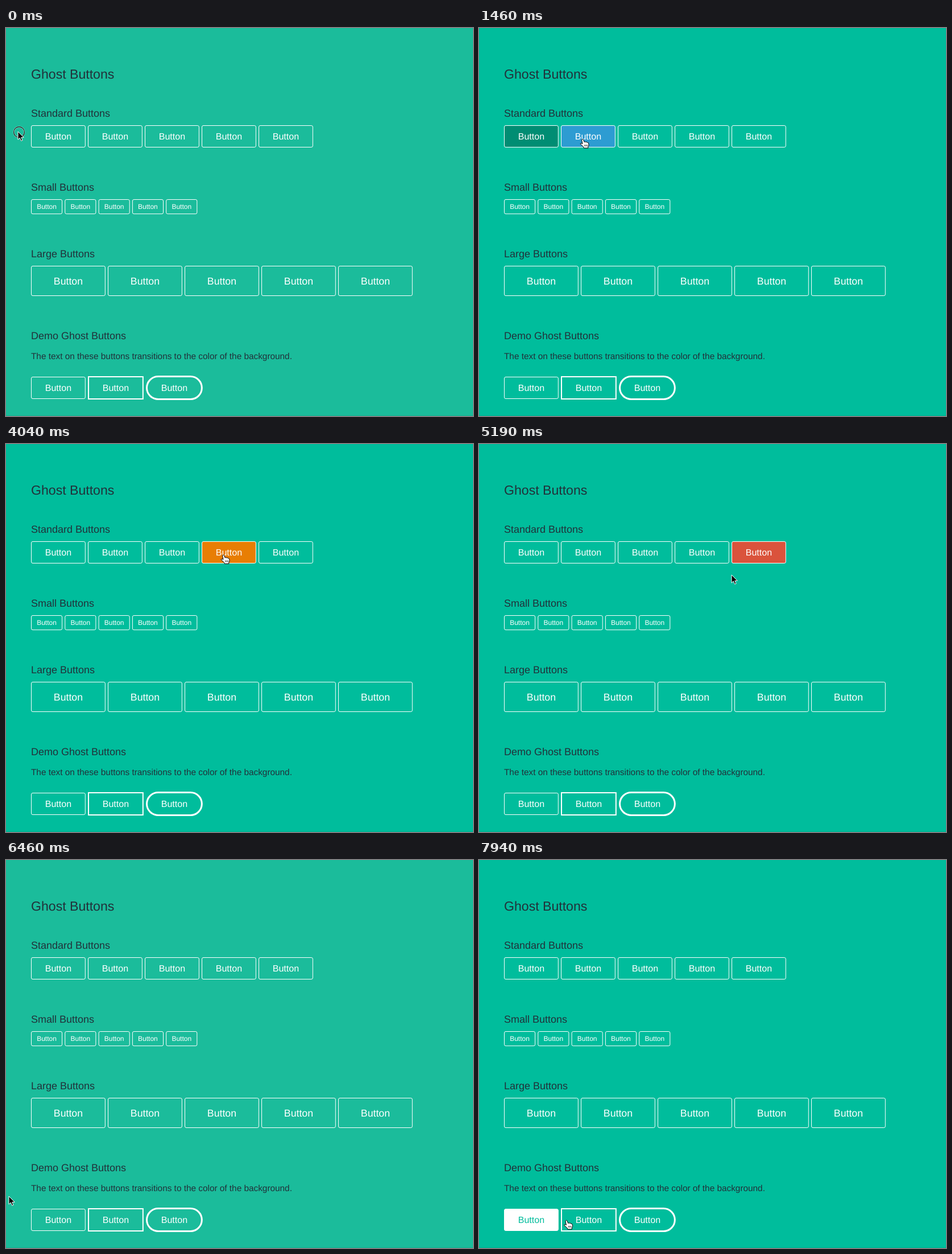
An HTML page for the animation above (8 s loop, 821 px wide and 682 px high).

```html
<!DOCTYPE html>
<html lang="en">
<head>
<meta charset="utf-8">
<title>Ghost Buttons</title>
<style>
  html, body { margin: 0; width: 100%; height: 100%; overflow: hidden; }
  svg {
    display: block;
    font-family: "Liberation Sans", Arial, sans-serif;
    text-rendering: geometricPrecision;
  }
  .dark { fill: #22313a; }
</style>
</head>
<body>
<svg id="stage" width="821" height="682" viewBox="0 0 821 682">
  <rect id="back" width="821" height="682"/>
  <rect y="680.5" width="821" height="1.5" fill="#000" opacity=".06"/>
  <g id="page"></g>
  <g id="ring" fill="none">
    <circle cx="23" cy="183" r="9.3" stroke="#fff" stroke-opacity=".6" stroke-width="2.4"/>
    <circle cx="23" cy="183" r="9.4" stroke="#111" stroke-width="1.2"/>
  </g>
  <path id="arrow" d="M0 0V14.2L3.3 11.1L5.6 16.4L8 15.4L5.8 10.3H10.2Z" fill="#000" stroke="#fff"/>
  <g id="hand" stroke="#000" stroke-linejoin="round">
    <path fill="#fff" d="M-2 1.5Q-.5-.7 1 1.2L2.6 5.5Q4.3 4.2 5.4 5.6Q7 4.9 8 6.3Q9.8 6 10.2 8L10.5 11L9.3 13.5V16H1.8L1 13.7L-4 9.3Q-5 7.3-2.6 7.6L-.6 8.6Z"/>
    <path d="M3.3 10v3.2M5.5 10v3.2M7.7 10v3.2" stroke-width=".8"/>
  </g>
</svg>
<script>
const LOOP = 8000;
const FADE = 200;   // length of a colour transition
const HOLD = 160;   // a button stays lit this long after the pointer leaves
const LEFT = 44, GAP = 4.2;
const GREEN = '#1bbc9b', BRIGHT = '#00bd9c', WHITE = '#ffffff';
const $ = id => document.getElementById(id);
const page = $('page');
const buttons = [];

function add(tag, attrs, text) {
  const el = document.createElementNS('http://www.w3.org/2000/svg', tag);
  for (const name in attrs) el.setAttribute(name, attrs[name]);
  if (text) el.textContent = text;
  return page.appendChild(el);
}

function heading(y, size, text) {
  add('text', { x: LEFT, y, 'font-size': size, class: 'dark' }, text);
}

// x, y, w and h are the outer edges; the border lies inside them.
function button(x, y, w, h, size, { border = 1, radius = 2.5, color } = {}) {
  const box = add('rect', {
    x: x + border / 2, y: y + border / 2, width: w - border, height: h - border,
    rx: radius, stroke: WHITE, 'stroke-width': border, fill: color || 'none'
  });
  const label = add('text', {
    x: x + w / 2, y: y + h / 2 + size * 0.36, 'font-size': size,
    'text-anchor': 'middle', fill: WHITE
  }, 'Button');
  buttons.push({ x, y, w, h, color, box, label });
}

// Lays buttons side by side; a thicker border grows the button outwards.
function row(y, w, h, size, styles) {
  let x = LEFT;
  for (const style of styles) {
    const extra = (style.border || 1) - 1;
    button(x, y - extra, w + 2 * extra, h + 2 * extra, size, style);
    x += w + 2 * extra + GAP;
  }
}

const colors = ['#008d73', '#3498db', '#9a51b3', '#e87e04', '#da533c'];
const plain = colors.map(() => ({}));

heading(89, 23.1, 'Ghost Buttons');
heading(156, 18, 'Standard Buttons');
row(171, 95.8, 39, 16, colors.map(color => ({ color })));
heading(286, 18, 'Small Buttons');
row(301, 55.1, 26.2, 12, plain);
heading(403, 18, 'Large Buttons');
row(418, 130.8, 53, 17.7, plain);
heading(547, 18, 'Demo Ghost Buttons');
heading(582, 15.35, 'The text on these buttons transitions to the color of the background.');
row(613, 95.8, 39, 16, [{ color: WHITE }, { border: 2, radius: 0 }, { border: 3, radius: 20 }]);

// Stops of the pointer: x, y, arrival, departure
const stops = [
  [21, 182, 0, 320], [80, 195, 600, 1050], [182.5, 195, 1460, 2100],
  [275, 195, 2700, 3200], [382.5, 194.5, 3950, 4060], [485, 195, 4750, 5020],
  [444, 230, 5190, 5190], [272, 240, 5390, 5390], [40, 285, 5800, 5800],
  [8, 374, 6070, 6070], [5, 591, 6460, 6540], [88, 633, 7000, 7400],
  [154, 633, 7940, LOOP]
];

const clamp = k => Math.max(0, Math.min(1, k));
const smooth = k => k * k * (3 - 2 * k);
const lerp = (a, b, k) => a + (b - a) * k;

function pointerAt(t) {
  const i = Math.max(1, stops.findIndex(stop => stop[2] > t));
  if (t >= stops.at(-1)[2]) return stops.at(-1);
  const [x0, y0, , leave] = stops[i - 1], [x1, y1, arrive] = stops[i];
  const k = clamp((t - leave) / (arrive - leave));
  return [lerp(x0, x1, k), lerp(y0, y1, k)];
}

function isOver(b, t) {
  const [x, y] = pointerAt(t);
  return x >= b.x && x < b.x + b.w && y >= b.y && y < b.y + b.h;
}

// Share of the last FADE ms in which the button was lit, eased.
function glow(b, t) {
  const samples = 40;
  let lit = 0;
  for (let i = 0; i < samples; i++) {
    const past = t - FADE * i / samples;
    if (isOver(b, past) || isOver(b, past - HOLD)) lit++;
  }
  return smooth(lit / samples);
}

function mix(a, b, k) {
  const channel = (hex, i) => parseInt(hex.slice(i, i + 2), 16);
  return `rgb(${[1, 3, 5].map(i => Math.round(lerp(channel(a, i), channel(b, i), k)))})`;
}

function draw(t) {
  const bright = (t >= 420 && t < 6280) || t >= 6780;
  const ground = bright ? BRIGHT : GREEN;
  $('back').setAttribute('fill', ground);

  for (const b of buttons.filter(b => b.color)) {
    const k = glow(b, t);
    b.box.setAttribute('fill-opacity', k);
    if (b.color === WHITE) b.label.setAttribute('fill', mix(WHITE, ground, k));
  }

  const [x, y] = pointerAt(t);
  const over = buttons.some(b => isOver(b, t));
  for (const [id, shown] of [['arrow', !over], ['hand', over]]) {
    $(id).setAttribute('transform', `translate(${x} ${y})`);
    $(id).setAttribute('visibility', shown ? 'visible' : 'hidden');
  }
  $('ring').setAttribute('visibility', t < 50 ? 'visible' : 'hidden');
}

let start;
function tick(now) {
  start ??= now;
  draw((now - start) % LOOP);
  requestAnimationFrame(tick);
}
draw(0);
requestAnimationFrame(tick);
</script>
</body>
</html>
```
